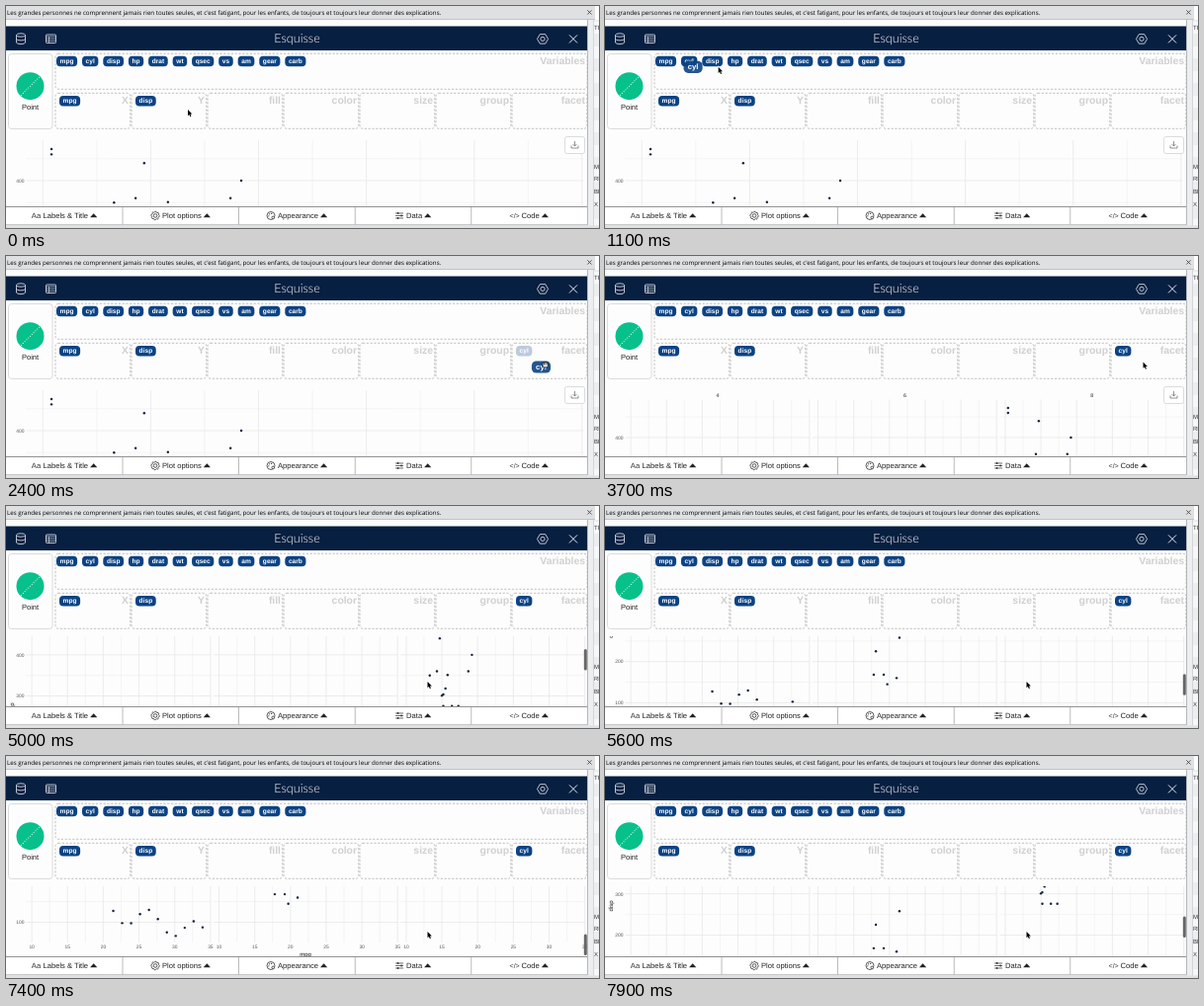
These frames come from a looping animation (600x225 px, 8000 ms). An HTML page with a canvas:

```html
<!DOCTYPE html>
<html lang="fr">
<meta charset="utf-8">
<title>Esquisse</title>
<style>
  html, body { margin: 0; width: 100%; height: 100%; overflow: hidden; background: #fff; }
  canvas { display: block; }
</style>
<canvas width="600" height="225"></canvas>
<script>
const ctx = document.querySelector('canvas').getContext('2d');
ctx.textRendering = 'geometricPrecision';
const SANS = '"Liberation Sans", Arial, sans-serif';
const NAVY = '#071f41', BLUE = '#0b4384', INK = '#333', ICON = '#e6ebf2';

// Fuel use against engine size, by number of cylinders
const cars = {
  4: Array.from({ length: 11 }, (_, i) =>
    [21.4 + i * 1.25, 126 - 5.3 * i + 25 * Math.sin(1.2 * i - 3.2)]),
  6: [[21, 160], [21.4, 258], [18.1, 225], [19.2, 168], [17.8, 168], [19.7, 145]],
  8: [[18.7, 360], [14.3, 360], [16.4, 276], [17.3, 276], [15.2, 276], [10.4, 472],
      [10.4, 460], [14.7, 440], [15.5, 318], [15.2, 304], [13.3, 350], [19.2, 400],
      [15.8, 351], [15, 301]]
};
const variables = ['mpg', 'cyl', 'disp', 'hp', 'drat', 'wt', 'qsec', 'vs', 'am', 'gear', 'carb'];
const slots = ['X', 'Y', 'fill', 'color', 'size', 'group', 'facet'];
const slotX = i => 50 + i * 77;

// Value after a series of eased moves, each [start, duration, destination]
function follow(value, moves, t) {
  for (const [start, duration, to] of moves) {
    const u = Math.max(0, Math.min(1, (t - start) / duration));
    value += (to - value) * u * u * (3 - 2 * u);
  }
  return value;
}

const scrollAt = t => follow(0, [[4500, 1600, 143], [7300, 1200, 29]], t);

function pointerAt(t) {
  const grab = [250, 650], drag = [900, 1270], leave = [3700, 400];
  const x = follow(184, [[0, 100, 171], [...grab, 84], [...drag, 544.5], [...leave, 426.5]], t);
  const dragLeft = 1 - follow(0, [[...drag, 1]], t);
  const y = t < 900
    ? follow(105, [[0, 100, 86], [...grab, 55]], t)
    : follow(107.5 - 52.5 * dragLeft ** 2, [[...leave, 178]], t);
  return [x, y];
}

function rect(x, y, w, h, color) { ctx.fillStyle = color; ctx.fillRect(x, y, w, h); }

function text(str, x, y, size, color = INK, align = 'left', weight = '', family = SANS) {
  ctx.font = `${weight} ${size}px ${family}`;
  ctx.textAlign = align;
  ctx.fillStyle = color;
  ctx.fillText(str, x, y);
}

function textWidth(str, size, weight = '') {
  ctx.font = `${weight} ${size}px ${SANS}`;
  return ctx.measureText(str).width;
}

function paint(fill, stroke, width = 0.8) {
  if (fill) { ctx.fillStyle = fill; ctx.fill(); }
  if (stroke) { ctx.strokeStyle = stroke; ctx.lineWidth = width; ctx.stroke(); }
}

function shape(path, fill, stroke, width) {
  const p = new Path2D(path);
  if (fill) { ctx.fillStyle = fill; ctx.fill(p); }
  if (stroke) { ctx.strokeStyle = stroke; ctx.lineWidth = width; ctx.stroke(p); }
}

function line(x1, y1, x2, y2, color, width = 0.8) {
  ctx.beginPath();
  ctx.moveTo(x1, y1);
  ctx.lineTo(x2, y2);
  paint(null, color, width);
}

function cross(x, y, r, color) {
  line(x - r, y - r, x + r, y + r, color, 1);
  line(x + r, y - r, x - r, y + r, color, 1);
}

function box(x, y, w, h, r, stroke, fill, dash = []) {
  ctx.beginPath();
  ctx.roundRect(x, y, w, h, r);
  ctx.setLineDash(dash);
  paint(fill, stroke);
  ctx.setLineDash([]);
}

function circle(x, y, r, fill, stroke) {
  ctx.beginPath();
  ctx.arc(x, y, r, 0, 7);
  paint(fill, stroke);
}

// Closed outline whose radius depends on the corner index
function ring(x, y, corners, radius, color) {
  ctx.beginPath();
  for (let i = 0; i < corners; i++) {
    const a = i * 2 * Math.PI / corners;
    ctx.lineTo(x + radius(i) * Math.cos(a), y + radius(i) * Math.sin(a));
  }
  ctx.closePath();
  paint(null, color);
}

const pillWidth = name => textWidth(name, 6.6, 'bold') + 7.2;

// A pill with its left edge at x, centred on y
function pill(name, x, y, alpha = 1, scale = 1) {
  const w = pillWidth(name) * scale, h = 10.4 * scale;
  ctx.globalAlpha = alpha;
  box(x, y - h / 2, w, h, 4 * scale, null, BLUE);
  ctx.globalAlpha = 1;
  text(name, x + w / 2, y + 2 * scale, 6.6 * scale, '#fff', 'center', 'bold');
}

function drawWindow() {
  rect(0, 0, 600, 225, '#fdfdfd');
  rect(588, 14, 12, 211, '#eceef0');
  for (let y = 16; y < 225; y += 25) rect(595, y, 5, 12, '#f7f8f9');
  rect(588, 14, 1, 208, '#b5b7ba');
  rect(594, 14, 0.7, 211, '#c9cbce');
  ['ME', 'RE', 'BE', 'X'].forEach((s, i) => text(s, 595, 164.5 + i * 12.7, 6, INK));
  text('TF', 595, 24, 6, INK);
  rect(0, 0, 596, 13, '#dfe0e2');
  rect(0, 13, 596, 0.8, '#b4b4b4');
  text("Les grandes personnes ne comprennent jamais rien toutes seules, et c'est fatigant, pour les enfants, de toujours et toujours leur donner des explications.",
    1, 9, 6.18, '#000', 'left', '', '"Open Sans", sans-serif');
  cross(590.4, 6.4, 2.1, '#555');

  rect(0, 20.5, 588, 24.5, NAVY);
  text('Esquisse', 294.5, 37.3, 12.6, '#fff', 'center', '300', 'Lato, sans-serif');
  for (let i = 0; i < 3; i++) {
    ctx.beginPath();
    ctx.ellipse(15, 29.5 + i * 3.7, 4.5, 1.7, 0, 0, i ? Math.PI : 7);
    paint(null, ICON);
  }
  line(10.5, 29.5, 10.5, 37, ICON);
  line(19.5, 29.5, 19.5, 37, ICON);
  box(40.5, 29, 10, 8.5, 0.8, ICON);
  for (let y = 31; y < 37; y += 2.2) line(40.5, y, 50.5, y, ICON, 0.6);
  line(43.5, 31, 43.5, 37.5, ICON, 0.6);
  ring(543, 33.4, 6, () => 5.5, ICON);
  circle(543, 33.4, 2.1, null, ICON);
  cross(574, 33.4, 4, ICON);
}

function drawVariables() {
  box(2.5, 48.5, 44.5, 76, 3, '#d3d3d3');
  circle(24.5, 81.2, 14, '#08c08b');
  for (let d = -9; d <= 9; d += 1.8) circle(24.5 + d, 81.2 - d, 0.55, '#e8fff7');
  text('Point', 24.5, 104.7, 7.5, '#222', 'center');

  const gray = '#b0b0b0', title = '#d0d0d0', dash = [2.2, 1.6];
  box(50, 48.3, 538, 36, 3, gray, null, dash);
  text('Variables', 586, 59.3, 10.4, title, 'right', 'bold');
  let x = 51;
  for (const name of variables) {
    pill(name, x, 56);
    x += pillWidth(name) + 4.9;
  }
  slots.forEach((name, i) => {
    box(slotX(i), 88.3, 75.8, 36, 3, gray, null, dash);
    text(name, slotX(i) + 74, 99.4, 10.4, title, 'right', 'bold');
  });
  pill('mpg', slotX(0) + 4, 96.3);
  pill('disp', slotX(1) + 4, 96.3);
}

function drawPlot(t) {
  const faceted = t >= 3700, scroll = scrollAt(t);
  const px = (mpg, panel) =>
    faceted ? 26.1 + panel * 189.4 + (mpg - 10) * 7.23 : 37.3 + (mpg - 10) * 21.82;
  const py = disp => faceted ? 184 + (400 - disp) * 0.4175 : 177 + (400 - disp) * 0.444;
  const top = py(492), bottom = py(51), grid = '#e9e9e9';

  ctx.save();
  ctx.beginPath();
  ctx.rect(0, 132, 588, 71);
  ctx.clip();
  ctx.translate(0, -scroll);
  Object.keys(cars).forEach((cyl, i) => {
    const x = mpg => px(mpg, faceted ? i : 0);
    if (faceted || i === 0) {
      for (let m = 10; m <= 35; m += 2.5) {
        line(x(m), top, x(m), bottom, grid, m % 5 ? 0.45 : 0.85);
        if (m % 5 === 0) text(m, x(m), bottom + 6.4, 4.9, '#555', 'center');
      }
      for (let d = 100; d <= 450; d += 50)
        line(x(9.225), py(d), x(35.075), py(d), grid, d % 100 ? 0.45 : 0.85);
    }
    if (faceted) text(cyl, x(22.15), 143, 5.2, '#222', 'center');
    for (const [m, d] of cars[cyl]) circle(x(m), py(d), 1.2, '#11203a');
  });
  for (let d = 100; d <= 400; d += 100) text(d, 18.5, py(d) + 1.8, 4.9, '#555', 'right');
  text('mpg', 303, bottom + 13.6, 6, '#111', 'center');
  ctx.save();
  ctx.translate(7.8, 238);
  ctx.rotate(-Math.PI / 2);
  text('disp', 0, 0, 6, '#111', 'center');
  ctx.restore();

  box(565.5, 132.5, 20, 17, 2, '#d0d3d6', '#fff');
  shape('M575.5 137v5m-2-2l2 2 2-2m-5.5 1.5v2.5h7v-2.5', null, '#666', 0.7);
  ctx.restore();

  if (t >= 4600) {
    ctx.globalAlpha = t >= 7400 ? 1 : Math.max(0, Math.min(1, (7000 - t) / 400));
    box(584.8, 134 + scroll * 0.33, 3, 21.5, 1.5, null, '#666');
    ctx.globalAlpha = 1;
  }
}

// Icons centred on (x, y)
const menu = {
  'Labels & Title': (x, y) => text('Aa', x, y + 2.8, 7.6, INK, 'center'),
  'Plot options': (x, y) => {
    ring(x, y, 32, i => i % 4 < 2 ? 4.3 : 3.5, INK);
    circle(x, y, 1.8, null, INK);
  },
  'Appearance': (x, y) => {
    circle(x, y, 4, null, INK);
    for (let a = 3; a < 6; a++) circle(x + 2.2 * Math.cos(a), y + 2.2 * Math.sin(a), 0.6, INK);
    circle(x + 2.2, y + 1.9, 1.3, '#fff', INK);
  },
  'Data': (x, y) => {
    for (let i = -1; i < 2; i++) {
      line(x - 4, y + i * 2.5, x + 4, y + i * 2.5, INK, 0.7);
      circle(x + (i ? -1.5 : 2), y + i * 2.5, 0.9, INK);
    }
  },
  'Code': (x, y) => text('</>', x, y + 2.6, 7, INK, 'center')
};

function drawMenu() {
  rect(0, 203, 588, 19, '#fff');
  rect(0, 203, 588, 0.8, '#777');
  rect(0, 221.4, 588, 1, '#a5a7aa');
  rect(0, 222.4, 600, 2.6, '#dfe1e4');
  Object.keys(menu).forEach((label, i) => {
    const w = textWidth(label, 7.6), x = (i + 0.5) * 117.6 - (w + 20) / 2;
    if (i) rect(i * 117.6, 204, 0.8, 17.5, '#aaa');
    menu[label](x + 4.5, 212.5);
    text(label, x + 11.5, 215.3, 7.6, '#222');
    shape(`M${x + w + 13.5} 214.2l3.6-3.9 3.6 3.9z`, '#222');
  });
}

function drawDrag(t) {
  const home = slotX(6) + 4;
  if (t >= 3100) return pill('cyl', home, 96.3);
  if (t < 1100) return;
  const [x, y] = pointerAt(t - 100);
  const gx = x - 3, gy = y + 5;
  if (gy > 88) {
    const slot = Math.floor((gx - 50) / 77);
    pill('cyl', slotX(slot) + (slot < 2 ? 28 : 4), 96.3, 0.27);
  }
  if (t < 2900) pill('cyl', gx - 9.6, gy, 0.9, 1.17);
}

function drawPointer(t) {
  const [x, y] = pointerAt(t);
  ctx.save();
  ctx.translate(x, y);
  if (t >= 2100 && t < 3100) {
    box(-1.5, 0, 5.5, 5.5, 1.8, '#111', '#ddd');
    for (let i = 0; i < 3; i++) line(i * 1.4, 0.2, i * 1.4, 2.6, '#111', 0.6);
  } else {
    const arrow = 'M0 0v6.2l1.4-1.2 1 2.2 1-.4-.9-2.2 1.9-.2z';
    shape(arrow, null, '#fff', 1.2);
    shape(arrow, '#000');
  }
  ctx.restore();
}

function frame(now) {
  const t = Math.floor(now % 8000 / 100) * 100;
  drawWindow();
  drawVariables();
  drawPlot(t);
  drawMenu();
  drawDrag(t);
  drawPointer(t);
  requestAnimationFrame(frame);
}
requestAnimationFrame(frame);
</script>
</html>
```
